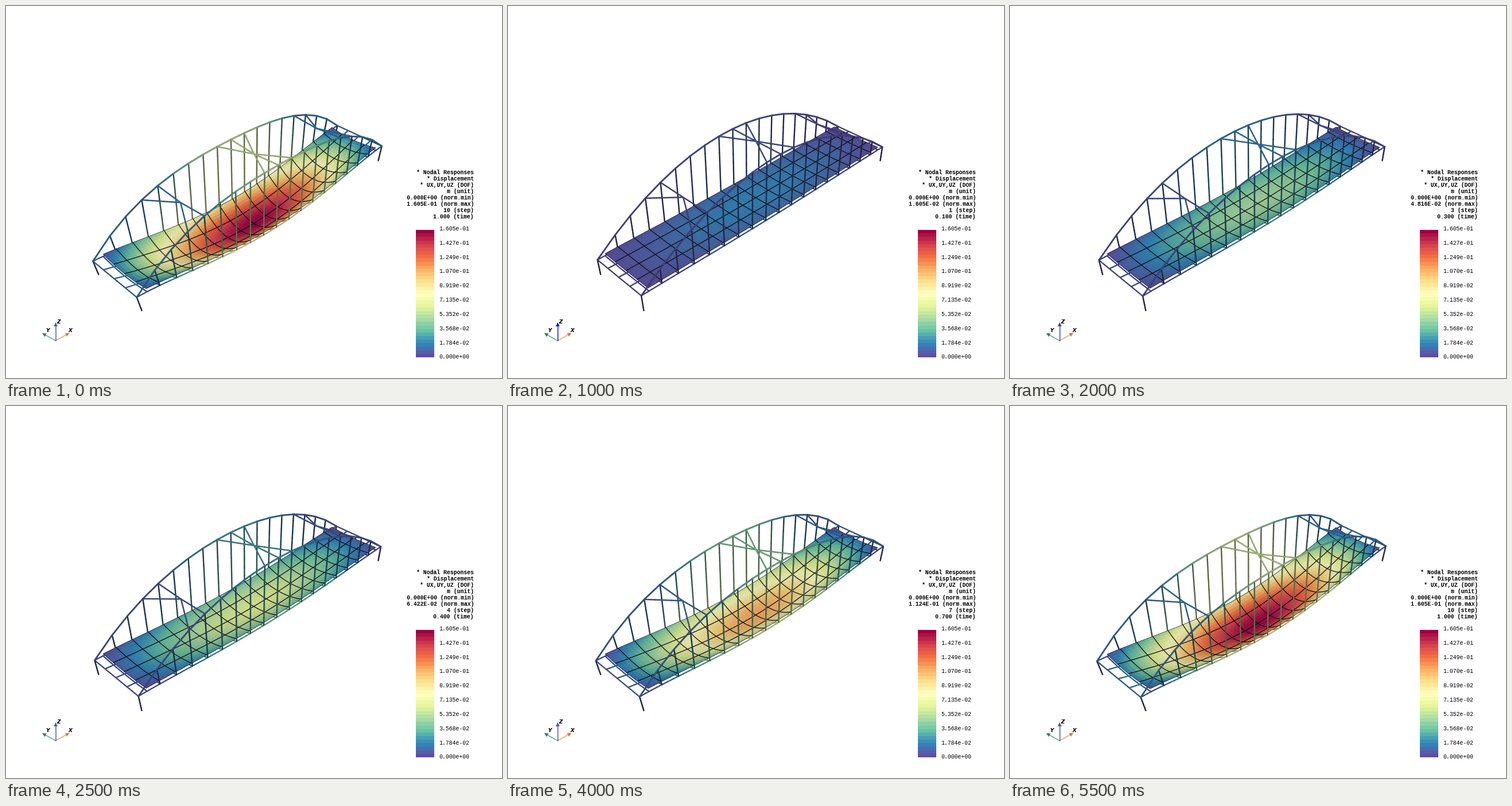
Animation of 864x648 px, one loop 6000 ms. Source, as a matplotlib script:

```python
import numpy as np
import matplotlib.pyplot as plt
from matplotlib.animation import FuncAnimation
from matplotlib.collections import LineCollection, PolyCollection
from matplotlib.patches import Polygon, Rectangle

W, H = 864, 648
STEPS = 10
PEAK = 0.160545          # largest displacement, m
SAG = 0.55               # the same displacement in units of arch height
MID, HALF = 9, 9.2       # midspan and half span, in panels
ENDS = (MID - HALF, MID + HALF)
RIBS = np.arange(1, 18)
DECK_ENDS = (.23, 17.77)
EDGE = (.012, .988)
QUARTERS = (.25, .5, .75)
CMAP = plt.get_cmap("Spectral_r")

# Tube looks: (line width, brightness), outer layer first.
ROUND = [(2.8, .56), (1.3, .82)]
THIN = [(2.2, .58), (1, .82)]
DARK = [(2.4, .4), (1, .46)]


def rise(x):
    return 1 - ((x - MID) / HALF) ** 2


def solve_camera():
    """Fit a perspective camera to a few joints seen on the stage."""
    joints = [  # panel, side, on the arch, screen x, screen y
        (ENDS[0], 0, 0, 233, 504), (MID, 0, 0, 472, 356.5),
        (ENDS[1], 0, 0, 652, 246), (ENDS[0], 1, 0, 156, 442),
        (4, 0, 1, 347, 360.5), (MID, 0, 1, 475, 255),
        (4, 1, 1, 266, 306.5), (MID, 1, 1, 392, 212), (14, 1, 1, 500, 187)]
    rows, rhs = [], []
    for x, y, on_arch, u, v in joints:
        p = np.array([x, y, on_arch * rise(x)])
        q, zero = np.append(p, 1), np.zeros(4)
        rows += [np.concatenate([q, zero, -u * p]),
                 np.concatenate([zero, q, -v * p])]
        rhs += [u, v]
    sol = np.linalg.lstsq(np.array(rows), np.array(rhs), rcond=None)[0]
    return np.append(sol, 1).reshape(3, 4)


CAMERA = solve_camera()


def project(p):
    q = p[..., :3] @ CAMERA[:, :3].T + CAMERA[:, 3]
    return q[..., :2] / q[..., 2:]


def bow(x):
    return np.maximum(np.cos(np.pi / 2 * (x - MID) / HALF), 0)


def edge_sag(x):
    return .56 * SAG * bow(x) ** 1.3


# Each returns rows of (x, y, z, displacement / peak) at load factor k.
def displaced(x, y, z, out, down, k):
    x, y = np.broadcast_arrays(np.asarray(x, float), y)
    return np.stack([x + np.sign(x - MID) * out * k, y, z - down * k,
                     k * np.hypot(.45 * out, down / SAG)], -1)


def arch(x, y, k):
    d = np.abs(x - MID)
    down = .2 * (.46 + .54 * np.cos(np.pi * d / 8))
    down = down * (1 - (d / HALF) ** 12)
    out = .21 * np.sin(2.25 * (d / HALF) ** 3)
    return displaced(x, y, rise(x), out, down, k)


def tie(x, y, k):
    out = .16 * (np.abs(x - MID) / HALF) ** 12
    return displaced(x, y, 0, out, edge_sag(x), k)


def deck(x, y, k, z=.045):
    down = edge_sag(x) + .44 * SAG * 4 * y * (1 - y) * bow(x) ** .6
    return displaced(x, y, z, 0, down, k)


def member(a, b, n=8):
    t = np.linspace(0, 1, n)[:, None]
    return a + (b - a) * t


fig = plt.figure(figsize=(W / 72, H / 72), dpi=72, facecolor="white")
ax = fig.add_axes([0, 0, 1, 1])
ax.set(xlim=(0, W), ylim=(H, 0))
ax.axis("off")
moving = []


def add(collection):
    collection.set_zorder(2 + .01 * len(moving))
    moving.append(ax.add_collection(collection, autolim=False))


def tint(values, shade):
    rgba = CMAP(np.clip(values, 0, 1))
    rgba[..., :3] *= np.asarray(shade)[..., None]
    return rgba


def tubes(paths, layers):
    segs, vals = [], []
    for p in paths:
        q = project(p)
        segs += list(np.stack([q[:-1], q[1:]], 1))
        vals += list((p[:-1, 3] + p[1:, 3]) / 2)
    for width, shade in layers:
        add(LineCollection(segs, linewidths=width, capstyle="round",
                           colors=tint(np.array(vals), shade)))


def side(y, k):
    tubes([tie(np.linspace(*ENDS, 60), y, k)], THIN)
    hangers = [member(arch(x, y, k), tie(x, y, k)) for x in RIBS]
    legs = [member(arch(x, y, k), np.array([x, y, -.27, 0])) for x in ENDS]
    tubes(hangers + legs, DARK)
    nodes = np.array([ENDS[0], *RIBS, ENDS[1]])
    tubes([arch(nodes, y, k)], ROUND)


def underside(k):
    across = np.linspace(0, 1, 17)
    paths = [member(arch(x, 0, k), arch(x, 1, k)) for x in ENDS]
    paths += [deck(x, across, k, 0) for x in (*DECK_ENDS, *RIBS)]
    paths += [member(arch(end, y, k), deck(x, y, k, 0))
              for y in QUARTERS for end, x in zip(ENDS, (1, 17))]
    tubes(paths, THIN)


def corners(grid):
    return np.stack([grid[:-1, :-1], grid[:-1, 1:],
                     grid[1:, 1:], grid[1:, :-1]], 2)


def areas(quads):
    a = quads[..., 2, :] - quads[..., 0, :]
    b = quads[..., 3, :] - quads[..., 1, :]
    return a[..., 0] * b[..., 1] - a[..., 1] * b[..., 0]


def plate(k):
    along, across = np.linspace(*DECK_ENDS, 73), np.linspace(*EDGE, 25)
    # Far cells come first so that nearer ones cover them.
    x, y = along[None, ::-1], across[::-1, None]
    grid = deck(x, y, k)
    quads = corners(project(grid))
    flat = corners(project(deck(x, y, 0)))
    facing = np.clip(areas(quads) / areas(flat), 0, 1)
    values = corners(grid)[..., 3].mean(-1)
    colors = tint(values, .89 * (.77 + .23 * facing)).reshape(-1, 4)
    add(PolyCollection(quads.reshape(-1, 4, 2), facecolors=colors,
                       edgecolors=colors, linewidths=.5))

    def mesh(stations, rows, width):
        lines = [deck(s, across, k) for s in stations]
        lines += [deck(along, r, k) for r in rows]
        add(LineCollection([project(p) for p in lines],
                           colors="#0c0a10", linewidths=width))

    mesh(RIBS, QUARTERS, 1.25)
    mesh(DECK_ENDS, EDGE, .6)


def bracing(k):
    paths = []
    for center, reach in ((4, (3, 4)), (9, (8, 9, 10)), (14, (14, 15))):
        hub = (arch(center, 0, k) + arch(center, 1, k)) / 2
        hub[2] -= .035 * k
        paths += [member(arch(x, y, k), hub) for x in reach for y in (0, 1)]
    tubes(paths, [(2.4, .58), (1.1, .82)])


def label(x, y, text, **style):
    style = dict(family="Liberation Mono", size=9.83, va="center") | style
    return ax.text(x, y, text, color="black", **style)


def draw_color_bar(bands=36, top=390, height=222):
    for i in range(bands):
        ax.add_patch(Rectangle((714, top + height * i / bands), 32,
                               height / bands, lw=0, antialiased=False,
                               color=CMAP(1 - i / (bands - 1))))
    for i in range(10):
        label(754, 611.5 - 24.85 * i, f"{PEAK * i / 9:.3e}")


def draw_arrow(name, tip, shaft, cone, name_at):
    origin, tip = np.array([86.5, 583]), np.array(tip)
    d = (tip - origin) / np.hypot(*(tip - origin))
    n = np.array([-d[1], d[0]])
    base = tip - 7 * d
    line, = ax.plot(*zip(origin, base), color=shaft, lw=1.5)
    head = ax.add_patch(Polygon([tip, base + 3.4 * n, base - 3.4 * n],
                                color=cone, lw=0))
    label(*name_at, name, family="DejaVu Sans", weight="bold",
          style="italic", size=9, ha="center")
    return line, head


draw_color_bar()
draw_arrow("X", (110.5, 569.5), "#f3a055", "#ee6c3a", (111.5, 565))
draw_arrow("Y", (63, 570), "#4fae90", "#3b7560", (72.5, 565))
z_arrow = draw_arrow("Z", (86.5, 551), "blue", "blue", (91.5, 550.5))
readout = [label(815, 290 + 11 * i, "", ha="right", weight="bold")
           for i in range(8)]


def update(frame):
    step = (frame - 1) % (STEPS + 2) if frame else STEPS
    k = step / STEPS
    while moving:
        moving.pop().remove()
    underside(k)
    side(1, k)
    plate(k)
    side(0, k)
    bracing(k)

    lines = ("* Nodal Responses", "* Displacement", "* UX,UY,UZ (DOF)",
             "m (unit)", "0.000E+00 (norm.min)",
             f"{PEAK * k:.3E} (norm.max)", f"{step} (step)", f"{k:.3f} (time)")
    for text, line in zip(readout, lines):
        text.set_text(line)
    fade = min(step / 4, 1)
    for part in z_arrow:
        part.set_color((.31 * fade, .35 * fade, 1 - .37 * fade))
    return moving + readout


anim = FuncAnimation(fig, update, frames=STEPS + 2, interval=500, repeat=True,
                     repeat_delay=0, blit=False, cache_frame_data=False)
plt.show()
```
